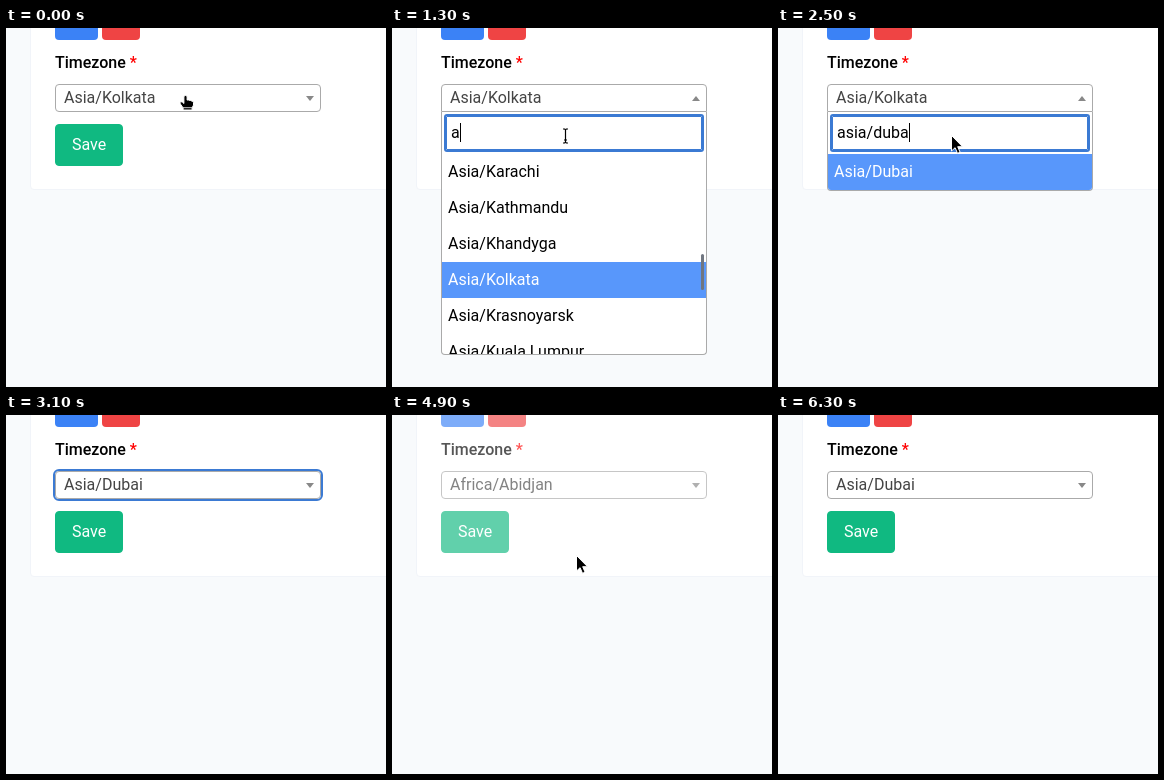
Recreate the animation shown at these times as an HTML page. Size 380x359 px, loop 6800 ms.

```html
<!DOCTYPE html>
<html lang="en">
<head>
<meta charset="utf-8">
<title>Timezone setting</title>
<style>
* { box-sizing: border-box; }
html, body { margin: 0; width: 100%; height: 100%; overflow: hidden; background: #f8fafc; }
body { position: relative; font: 16px/24px Roboto, sans-serif; color: #000; }
body div { position: absolute; white-space: pre; }
#card { left: 24px; top: -20px; width: 400px; height: 182px; background: #fff; border: 1px solid #f1f4f9; border-radius: 4px; }
#form { left: 0; top: 0; width: 380px; height: 162px; }
.chip { top: -30px; height: 42px; border-radius: 4px; }
#label { left: 49px; top: 23px; font-weight: 500; }
#label span { color: #f00; }
#select { left: 49px; top: 56px; width: 266px; height: 28px; padding-left: 8px; line-height: 26px; color: #444; background: #fff; border: 1px solid #aaa; border-radius: 4px; }
#select.open { border-radius: 4px 4px 0 0; }
#arrow { left: 250px; top: 11px; border: solid transparent; border-width: 5px 4px 0; border-top-color: #888; }
.open #arrow { border-width: 0 4px 5px; border-bottom-color: #888; }
#save { left: 49px; top: 96px; width: 68px; height: 42px; border: 1px solid #10b981; border-radius: 4px; line-height: 40px; text-align: center; color: #fff; background: #10b981; }
#save.hover { background: #059669; }
#drop { left: 49px; top: 84px; width: 266px; background: #fff; border: 1px solid #aaa; border-top: 0; border-radius: 0 0 4px 4px; overflow: hidden; }
#input { left: 4px; top: 4px; width: 256px; height: 34px; padding-left: 4px; line-height: 32px; border: 1px solid #aaa; }
.ring { outline: 2px solid #3b7ad3; }
#input.ring { border-color: #3b7ad3; outline-offset: 0; border-radius: 1px; }
#caret { display: inline-block; width: 1px; height: 19px; margin-right: -1px; vertical-align: -4px; background: #000; }
#list { left: 0; top: 42px; width: 264px; height: 200px; overflow: hidden; }
.row { left: 0; width: 264px; height: 36px; padding: 6px; }
.row.on { background: #5897fb; color: #fff; }
#thumb { left: 259px; width: 3px; height: 36px; border-radius: 2px; background: #707680; }
svg { position: absolute; left: 0; top: 0; width: 380px; height: 359px; pointer-events: none; }
</style>
</head>
<body>
<div id="card"></div>
<div id="form">
  <div class="chip" style="left:49px;width:43px;background:#3b82f6"></div>
  <div class="chip" style="left:96px;width:38px;background:#ef4444"></div>
  <div id="label">Timezone <span>*</span></div>
  <div id="select"><span id="value"></span><div id="arrow"></div></div>
  <div id="save">Save</div>
</div>
<div id="drop">
  <div id="input"><span id="query"></span><span id="caret"></span></div>
  <div id="list"></div>
  <div id="thumb"></div>
</div>
<svg>
  <g id="arrowCursor" stroke="#fff" stroke-linejoin="round">
    <path d="M0 0V15.5L3.6 12.2 6 17.8 8.6 16.7 6.2 11.2H11Z"/>
  </g>
  <g id="handCursor" stroke="#fff" stroke-linejoin="round">
    <path d="M-1.6.8Q0-.9 1.6.8V4.6Q3 4 4 5Q5.4 4.6 6.2 5.6Q8 5.4 8 7.2V9.6L6.6 12.4V14.5H-2.4V12.4L-5.2 8.4Q-6 6.6-4.6 6.2Q-3.2 6-1.6 8Z"/>
    <path d="M-2.4 12.2H6.6" stroke-width=".8"/>
  </g>
  <g id="beamCursor" fill="none">
    <path id="beam" d="M-2.5-6.5h1.7l.8.8.8-.8h1.7M0-5.7V6.7M-2.5 7.5h1.7l.8-.8.8.8h1.7M-1.5 4.5h3" stroke="#fff" stroke-width="3"/>
    <use href="#beam"/>
    <path d="M-2.5-6.5h1.7l.8.8.8-.8h1.7M0-5.7V6.7M-2.5 7.5h1.7l.8-.8.8.8h1.7M-1.5 4.5h3" stroke="#000" stroke-width="1.2"/>
  </g>
</svg>
<script>
const LOOP = 6800;
const $ = id => document.getElementById(id);

const around = ['Karachi', 'Kathmandu', 'Khandyga', 'Kolkata', 'Krasnoyarsk', 'Kuala Lumpur', 'Kuching'];
const LISTS = {
  near: { rows: around.slice(1), on: 2 },
  shifted: { rows: around.slice(0, 6), on: 3 },
  d: { rows: ['Damascus', 'Dhaka', 'Dili', 'Dubai', 'Dushanbe'], on: 0 },
  du: { rows: ['Dubai', 'Dushanbe'], on: 0 },
  dub: { rows: ['Dubai'], on: 0 }
};

// [time, changed properties]
const STEPS = [
  [0, { value: 'Asia/Kolkata', list: '', query: '', caret: false, focus: false, ring: false, fade: 1, thumb: 0 }],
  [200, { list: 'near', thumb: 226 }],
  [400, { focus: true }],
  [500, { caret: true }],
  [1200, { query: 'a' }],
  [1300, { list: 'shifted' }],
  [1400, { query: 'as', list: 'near', thumb: 208 }],
  [1500, { query: 'asi', thumb: 204 }],
  [1600, { query: 'asia' }],
  [1700, { query: 'asia/' }],
  [1800, { caret: false }],
  [2000, { query: 'asia/d', list: 'd', thumb: 0, caret: true }],
  [2100, { query: 'asia/du', list: 'du' }],
  [2200, { query: 'asia/dub', list: 'dub' }],
  [2300, { caret: false }],
  [2500, { query: 'asia/duba', caret: true }],
  [2600, { value: 'Asia/Dubai', list: '', ring: true }],
  [4100, { ring: false }],
  [4300, { fade: .8 }],
  [4400, { fade: .5 }],
  [4900, { value: 'Africa/Abidjan', fade: .66 }],
  [5000, { fade: .95 }],
  [5100, { value: 'Asia/Dubai', fade: 1 }]
];

// [time, cursor shape, x, y]
const POINTER = [
  [0, 'hand', 179, 67], [400, 'hand', 178, 74], [500, 'beam', 175, 92],
  [600, 'beam', 173, 102], [700, 'beam', 173, 107], [2500, 'arrow', 173, 107],
  [3100, '', 0, 0],
  [3700, 'arrow', 336, 266], [3800, 'arrow', 242, 196], [3900, 'arrow', 150, 146], [4000, 'hand', 100, 127],
  [4400, 'hand', 106, 132], [4500, 'arrow', 134, 172], [4600, 'arrow', 164, 200],
  [4700, 'arrow', 180, 184], [4800, 'arrow', 185, 158], [4900, 'arrow', 184, 140],
  [5000, 'arrow', 146, 140], [5100, 'hand', 90, 130], [5200, 'arrow', 43, 112],
  [5300, 'arrow', 62, 88], [5400, 'hand', 98, 81], [5500, 'hand', 122, 79],
  [5600, 'hand', 136, 79], [5700, 'hand', 133, 79],
  [6100, 'arrow', 114, 52], [6200, 'hand', 73, 4], [6300, '', 0, 0]
];

const shapes = { arrow: $('arrowCursor'), hand: $('handCursor'), beam: $('beamCursor') };
let shownList = null;

function drawList(name) {
  if (name === shownList) return;
  shownList = name;
  $('drop').style.display = name ? 'block' : 'none';
  if (!name) return;
  const { rows, on } = LISTS[name];
  const height = Math.min(200, rows.length * 36);
  $('list').style.height = height + 'px';
  $('drop').style.height = 43 + height + 'px';
  $('list').replaceChildren(...rows.map((city, i) => {
    const row = document.createElement('div');
    row.className = i === on ? 'row on' : 'row';
    row.style.top = i * 36 + 'px';
    row.textContent = 'Asia/' + city;
    return row;
  }));
}

function drawPointer(t) {
  const [, shape, x, y] = POINTER.filter(p => p[0] <= t).pop();
  for (const key in shapes) shapes[key].style.display = key === shape ? '' : 'none';
  if (shape) shapes[shape].setAttribute('transform', `translate(${x + .5} ${y + .5})`);
  const overSave = shape === 'hand' && x >= 49 && x < 117 && y >= 96 && y < 138;
  $('save').classList.toggle('hover', overSave);
}

function draw(t) {
  const s = {};
  for (const [at, change] of STEPS) if (at <= t) Object.assign(s, change);
  $('value').textContent = s.value;
  $('query').textContent = s.query;
  $('caret').style.visibility = s.caret ? 'visible' : 'hidden';
  $('input').classList.toggle('ring', s.focus);
  $('select').classList.toggle('ring', s.ring);
  $('select').classList.toggle('open', s.list !== '');
  $('form').style.opacity = s.fade;
  $('thumb').style.display = s.thumb ? 'block' : 'none';
  $('thumb').style.top = s.thumb - 84 + 'px';
  drawList(s.list);
  drawPointer(t);
}

const start = performance.now();
function tick() {
  draw((performance.now() - start) % LOOP);
  requestAnimationFrame(tick);
}
tick();
</script>
</body>
</html>
```
